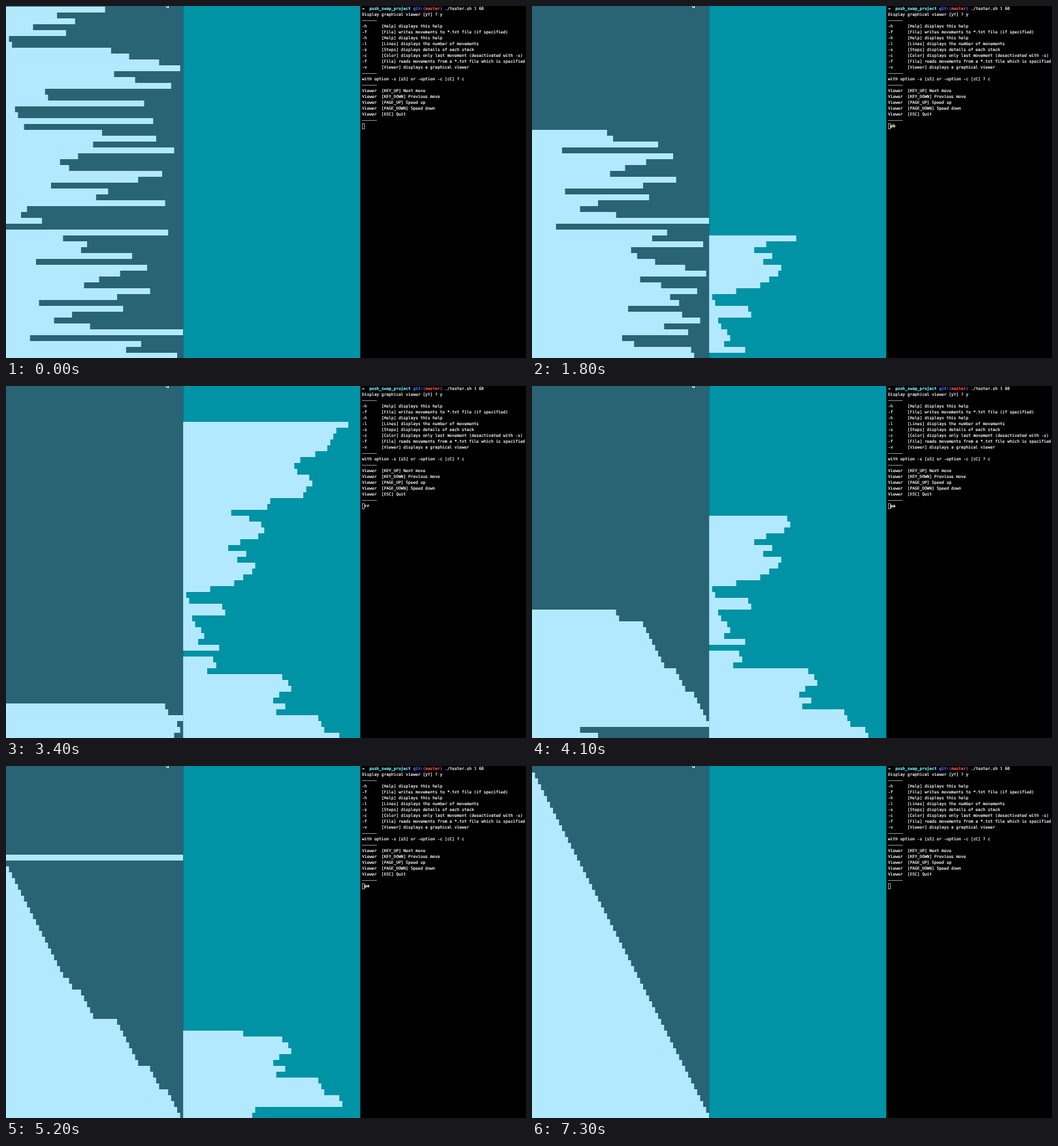
Write an HTML page with a canvas that moves like this. It is 796 px wide and 540 px high and loops after 7.4 s.

```html
<!DOCTYPE html>
<html lang="en">
<head>
<meta charset="utf-8">
<title>Stack sorting viewer</title>
<style>
  html, body { margin: 0; width: 100%; height: 100%; overflow: hidden; background: #000; }
  canvas { position: absolute; left: 0; top: 0; display: block; }
  pre {
    position: absolute; left: 545px; top: 0; margin: 0; color: #fff;
    font: 6.2px/9px "DejaVu Sans Mono", monospace; text-rendering: geometricPrecision;
    -webkit-text-stroke: 0.2px currentColor;
  }
  .arrow { color: #a8fff0; }
  .dir { color: #6ff0ff; }
  .git { color: #5a6cff; }
  .branch { color: #ff4a4a; }
  #cursor {
    position: absolute; left: 545px; top: 180px; width: 4px; height: 9px;
    box-sizing: border-box; border: 1px solid #a0a0a0;
  }
  #label { color: #ffffb8; }
</style>
</head>
<body>
<canvas id="stage" width="796" height="540"></canvas>
<pre><b class="arrow">→</b>  <b class="dir">push_swap_project</b> <b class="git">git:(</b><b class="branch">master</b><b class="git">)</b> ./tester.sh 1 60
Display graphical viewer [yY] ? y
––––––
-h      [Help] displays this help
-f      [File] writes movements to *.txt file (if specified)
-h      [Help] displays this help
-l      [Lines] displays the number of movements
-s      [Steps] displays details of each stack
-c      [Color] displays only last movement (desactivated with -s)
-f      [File] reads movements from a *.txt file which is specified
-v      [Viewer] displays a graphical viewer
––––––
with option -s [sS] or -option -c [cC] ? c
––––––
Viewer  [KEY_UP] Next move
Viewer  [KEY_DOWN] Previous move
Viewer  [PAGE_UP] Speed up
Viewer  [PAGE_DOWN] Speed down
Viewer  [ESC] Quit
––––––
 <b id="label"></b></pre>
<div id="cursor"></div>
<script>
const COUNT = 60, ROW = 9, TOP = 1, WIDTH = 271.2, LOOP = 7400;

const a = [
  33, 17, 23, 9, 20, 1, 2, 35, 41, 51, 58, 36, 43, 55, 13, 14, 46, 3, 4, 49,
  6, 32, 50, 29, 56, 24, 18, 21, 52, 44, 15, 34, 30, 53, 7, 5, 12, 0, 54, 19,
  27, 25, 42, 10, 47, 38, 31, 26, 48, 37, 11, 39, 22, 16, 28, 59, 8, 45, 40, 57
];
const b = [];
const states = [{ op: "", a: [...a], b: [] }];

function move(op) {
  if (op === "pb") b.unshift(a.shift());
  else if (op === "pa") a.unshift(b.shift());
  else {
    const end = op.at(-1);
    for (const s of end === "a" ? [a] : end === "b" ? [b] : [a, b]) {
      if (op[0] === "s") [s[0], s[1]] = [s[1], s[0]];
      else if (op.length === 3) s.unshift(s.pop());
      else s.push(s.shift());
    }
  }
  states.push({ op, a: [...a], b: [...b] });
}

// Push the lower half of what is left; its own lower half goes under stack b.
function split() {
  let base = 0;
  while (a.length > 4) {
    let left = a.length >> 1;
    const cut = base + left, low = base + (a.length >> 2);
    while (left) {
      const v = a[0];
      if (v >= cut) { move("ra"); continue; }
      move("pb");
      left--;
      if (v < low) move(a[0] >= cut ? "rr" : "rb");
      else if (b[0] < b[1]) move(a[0] > a[1] ? "ss" : "sb");
    }
    base = cut;
  }
  ["pb", "sa", "rra"].forEach(move);
}

// Signed number of rotations that bring index i to the top.
const turns = (i, n) => i <= n / 2 ? i : i - n;

function rotate(da, db) {
  while (da || db) {
    const sa = Math.sign(da), sb = Math.sign(db);
    const target = sa && sb && sa !== sb ? "b" : sa && sb ? "r" : sa ? "a" : "b";
    const dir = target === "a" ? sa : sb;
    move((dir > 0 ? "r" : "rr") + target);
    if (target !== "b") da -= sa;
    if (target !== "a") db -= sb;
  }
}

// Bring back the cheapest element each time.
function merge() {
  while (b.length) {
    let best = { cost: Infinity };
    b.forEach((v, i) => {
      const above = a.filter(x => x > v);
      const next = Math.min(...(above.length ? above : a));
      const da = turns(a.indexOf(next), a.length), db = turns(i, b.length);
      const cost = Math.abs(da) + Math.abs(db);
      if (cost < best.cost) best = { cost, da, db };
    });
    rotate(best.da, best.db);
    move("pa");
  }
  rotate(turns(a.indexOf(0), a.length), 0);
}

split();
merge();

// Playback speed: [time in ms, moves done]
const pace = [
  [0, 0], [100, 1.1], [900, 12], [1800, 53.2], [2700, 98.8],
  [4100, 174.2], [5200, 236.2], [5900, 277.2], [6600, states.length - 0.8]
];

function progress(t) {
  const k = pace.findIndex(([time]) => time >= t);
  if (k < 0) return states.length - 0.8;
  if (pace[k][0] === t) return pace[k][1];
  const [t0, p0] = pace[k - 1], [t1, p1] = pace[k];
  return p0 + (p1 - p0) * (t - t0) / (t1 - t0);
}

const ctx = document.getElementById("stage").getContext("2d");
const label = document.getElementById("label");

function drawStack(stack, x, back) {
  ctx.fillStyle = back;
  ctx.fillRect(x, 0, WIDTH, COUNT * ROW);
  ctx.fillStyle = "#b3e9ff";
  stack.forEach((v, i) => {
    const y = TOP + (COUNT - stack.length + i) * ROW;
    ctx.fillRect(x, y, WIDTH * v / (COUNT - 1), ROW);
  });
}

function drawPointer() {
  ctx.fillStyle = "#fff";
  ctx.fillRect(245, 0, 4, 2);
  ctx.fillRect(247, 2, 2, 1);
  ctx.fillStyle = "#000";
  ctx.fillRect(246, 0, 2, 1);
}

const start = performance.now();

function frame() {
  const t = Math.floor(((performance.now() - start + 1) % LOOP) / 100) * 100;
  const p = progress(t);
  const state = states[Math.floor(p)];
  ctx.clearRect(0, 0, 796, 540);
  drawStack(state.a, 0, "#296475");
  drawStack(state.b, WIDTH, "#0092a5");
  drawPointer();
  // The terminal prints a little after the picture.
  label.textContent = t < 6700 ? states[Math.max(0, Math.floor(p - 0.5))].op : "";
  requestAnimationFrame(frame);
}
frame();
</script>
</body>
</html>
```
